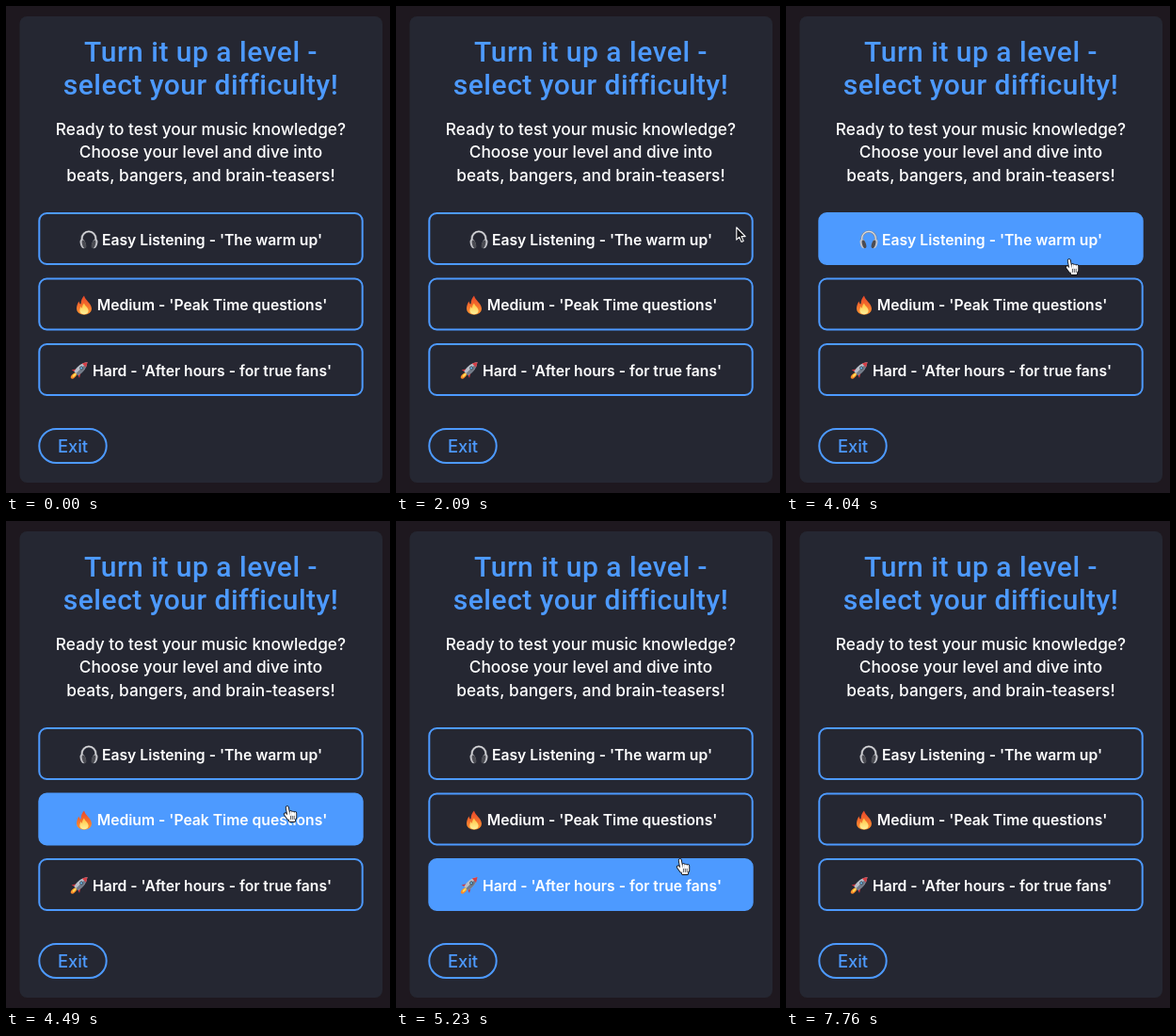
Animation, 408 px wide and 517 px high, one loop 8810 ms. Source, as an HTML page with a canvas:

```html
<!DOCTYPE html>
<html lang="en">
<head>
<meta charset="utf-8">
<title>Select your difficulty</title>
<style>
  html, body { margin: 0; width: 100%; height: 100%; overflow: hidden; background: #1e181f; }
  canvas { display: block; width: 408px; height: 517px; }
</style>
</head>
<body>
<canvas id="stage"></canvas>
<script>
const W = 408, H = 517, LOOP = 8810;
const BLUE = '#4d9aff', CARD = '#252732', INK = '#111116';
const ENTER = 598, TICK = 149.1, EXIT_TICK = 48;
const HOVER_TICK = 20; // buttons react to the pointer from here on
const BUTTON_H = 56;

const canvas = document.getElementById('stage');
const ctx = canvas.getContext('2d');
const scale = window.devicePixelRatio || 1;
canvas.width = W * scale;
canvas.height = H * scale;

// Pointer moves in ticks; it rests between them. "via" bends the path.
const origin = [381, 96];
const moves = [
  { from: 0, until: 10, via: [231, -10], to: [361, 234], ease: u => u * (2 - u) },
  { from: 10, until: 16, via: [410, 98], to: [329, 157] },
  { from: 17, until: 19, via: [303, 142], to: [348, 166] },
  { from: 20, until: 21, to: [297, 268] },
  { from: 25, until: 26, to: [295, 302] },
  { from: 26, until: 30, to: [302, 314] },
  { from: 30, until: 32, to: [294, 402] },
  { from: 37, until: 38, to: [300, 402] },
  { from: 44, until: 48, to: [344, 505] }
];

const buttons = [
  { label: "Easy Listening - 'The warm up'", icon: headphones, x: 78 },
  { label: "Medium - 'Peak Time questions'", icon: flame, x: 73 },
  { label: "Hard - 'After hours - for true fans'", icon: rocket, x: 67.5 }
];
buttons.forEach((b, i) => b.y = 219 + i * 69.5);

const smooth = u => u * u * (3 - 2 * u);

function pointerAt(tick) {
  let pos = origin;
  for (const { from, until, via, to, ease = smooth } of moves) {
    if (tick < from) break;
    const u = ease(Math.min(1, (tick - from) / (until - from)));
    pos = pos.map((p, k) => {
      const mid = via ? via[k] : (p + to[k]) / 2;
      return (1 - u) ** 2 * p + 2 * u * (1 - u) * mid + u * u * to[k];
    });
  }
  return pos;
}

function box(x, y, w, h, r, fill, stroke) {
  ctx.beginPath();
  ctx.roundRect(x, y, w, h, r);
  if (fill) { ctx.fillStyle = fill; ctx.fill(); }
  if (stroke) { ctx.strokeStyle = stroke; ctx.lineWidth = 2; ctx.stroke(); }
}

function text(str, x, y, font, color, spacing = 0) {
  ctx.font = font;
  ctx.letterSpacing = spacing + 'px';
  ctx.textAlign = 'center';
  ctx.fillStyle = color;
  ctx.fillText(str, x, y);
}

function shape(d, fill, stroke, width = 1) {
  const p = new Path2D(d);
  if (fill) { ctx.fillStyle = fill; ctx.fill(p); }
  if (stroke) { ctx.strokeStyle = stroke; ctx.lineWidth = width; ctx.stroke(p); }
}

function oval(x, y, rx, ry, fill, turn = 0) {
  ctx.beginPath();
  ctx.ellipse(x, y, rx, ry, turn, 0, 7);
  ctx.fillStyle = fill;
  ctx.fill();
}

function fade(top, bottom) {
  const g = ctx.createLinearGradient(0, 0, 0, 20);
  g.addColorStop(0, top);
  g.addColorStop(1, bottom);
  return g;
}

function at(x, y, draw) {
  ctx.save();
  ctx.translate(x, y);
  draw();
  ctx.restore();
}

function headphones() {
  const band = 'M2.6 13V9A7.4 7.6 0 0 1 17.4 9V13';
  shape(band, null, '#85868c', 2.4);
  shape(band, null, '#dcdde0', 1.2);
  for (const side of [-1, 1]) {
    const turn = side * 0.3;
    oval(10 + side * 6.3, 14.4, 2.8, 5, '#c3c4c9', turn);
    oval(10 + side * 5, 14.8, 2, 4.5, '#4b4c53', turn);
  }
}

function flame() {
  const tongue = 'M10 0C11 5 18 8 18 14A8 6.2 0 0 1 2 14C2 11 3 8 4.5 6C5 8 5.5 9 6.5 9C6.5 5 8 2 10 0Z';
  shape(tongue, fade('#e8452a', '#ff9630'));
  ctx.translate(4.2, 8);
  ctx.scale(0.58, 0.58);
  shape(tongue, fade('#ffc23c', '#fff09a'));
}

function rocket() {
  ctx.translate(10.5, 9.5);
  ctx.rotate(Math.PI / 4);
  oval(0, 8.5, 2, 4, '#ff8a28');
  oval(0, 7.5, 1.1, 2.6, '#ffdf55');
  shape('M0 -4L6 6L0 4L-6 6Z', '#cc3540');
  shape('M0 -12Q5.5 -5 3 5H-3Q-5.5 -5 0 -12Z', '#b9c0ca');
  shape('M0 -12Q5.5 -5 3 5H0Z', '#737c8a');
  shape('M0 -12L3 -7H-3Z', '#d63e46');
  oval(0, -3, 1.9, 1.9, '#3d4652');
  oval(0, -3, 1.1, 1.1, '#69b7e8');
}

function arrow() {
  ctx.lineJoin = 'round';
  shape('M.8 1V14.2L3.8 11.4L6 16.4L8.2 15.4L6.1 10.6H10.2Z', INK, '#fff', 1.1);
}

function hand() {
  ctx.lineJoin = ctx.lineCap = 'round';
  let fingers = 'M3.8 2.2L5.6 12M1.9 9.4L5 13.5';
  for (let i = 0; i < 3; i++) fingers += `M${7.6 + i * 2.3} ${7.2 + i * 0.5}V13`;
  const palm = 'M5.4 12H12.2L11.4 16.4H6.6Z';
  for (const [color, width] of [[INK, 4], ['#fff', 2.2]]) {
    shape(fingers, null, color, width);
    shape(palm, color, color, width - 1);
  }
  shape('M7.4 11.3V14.5M9.3 11.3V14.5M11.2 11.3V14.5', null, INK, 0.7);
}

function scene(t) {
  const tick = Math.floor((t - ENTER) / TICK);
  const shown = tick >= 0 && tick < EXIT_TICK;
  const [px, py] = pointerAt(tick);
  const hover = shown && tick > HOVER_TICK
    ? buttons.find(b => py >= b.y && py < b.y + BUTTON_H) : null;

  ctx.setTransform(scale, 0, 0, scale, 0, 0);
  ctx.fillStyle = '#1e181f';
  ctx.fillRect(0, 0, W, H);
  box(14.5, 11, 385.5, 495, 8, CARD);

  ['Turn it up a level -', 'select your difficulty!']
    .forEach((line, i) => text(line, 207, 59 + i * 35, '500 30px Roboto, sans-serif', BLUE, 0.5));

  ['Ready to test your music knowledge?', 'Choose your level and dive into', 'beats, bangers, and brain-teasers!']
    .forEach((line, i) => text(line, 207, 137 + i * 24.4, '500 17.3px Inter, sans-serif', '#fff'));

  for (const b of buttons) {
    box(35.3, b.y + 1, 343.4, BUTTON_H - 2, 8, b === hover ? BLUE : null, BLUE);
    at(b.x, b.y + 19, b.icon);
    text(b.label, 219, b.y + 34.8, '600 15.7px Inter, sans-serif', '#fff');
  }

  box(35.3, 449, 71.4, 36, 18, null, BLUE);
  text('Exit', 71, 474, '500 18.4px Inter, sans-serif', BLUE);

  if (shown) at(px, py, hover ? hand : arrow);
}

const start = performance.now();
function frame() {
  scene((performance.now() - start) % LOOP);
  requestAnimationFrame(frame);
}
frame();
</script>
</body>
</html>
```
